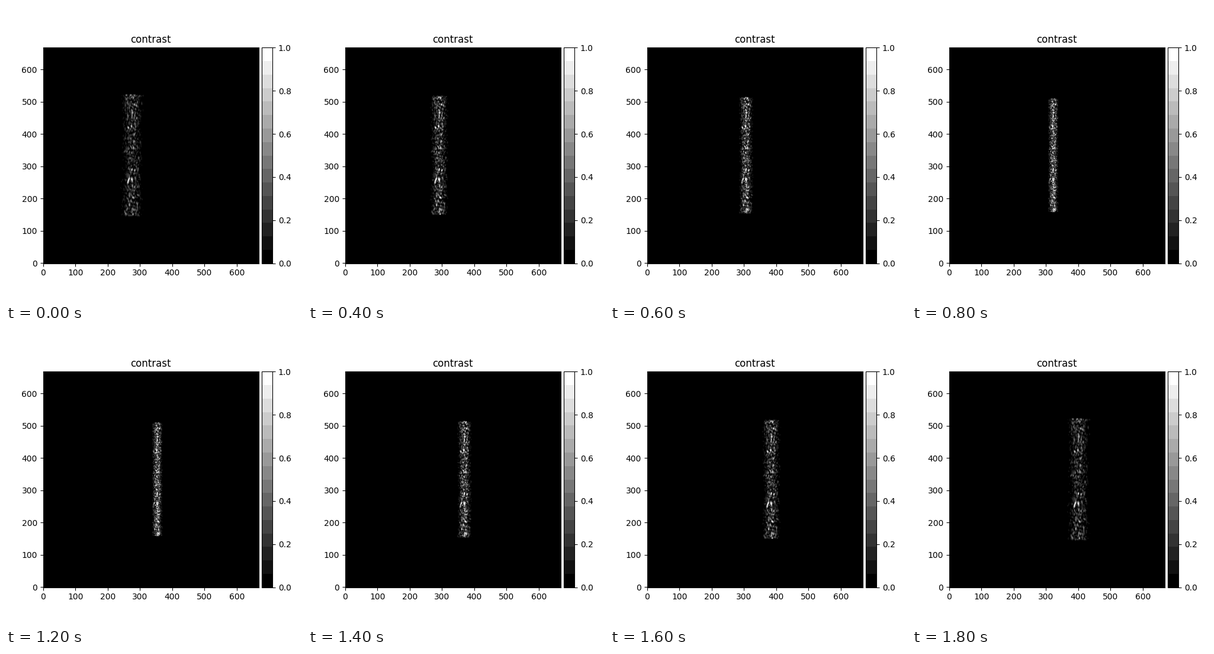
These frames come from a looping animation (500x500 px, 2000 ms). A matplotlib script:

```python
import numpy as np
import matplotlib.pyplot as plt
from matplotlib.animation import FuncAnimation
from mpl_toolkits.axes_grid1 import make_axes_locatable

SIZE = 668
PATCH_H, PATCH_W = 440, 96
STEPS = 10
DRIFT = 15.6

rng = np.random.default_rng(7)
noise = rng.normal(size=(PATCH_H, PATCH_W)) + 1j * rng.normal(size=(PATCH_H, PATCH_W))
spectrum = np.fft.fft2(noise)
freq_y = np.fft.fftfreq(PATCH_H)[:, None]
freq_x = np.fft.fftfreq(PATCH_W)[None, :]
y = np.arange(PATCH_H)[:, None] - PATCH_H / 2
x = np.arange(PATCH_W)[None, :] - PATCH_W / 2


def speckle(sigma_x, sigma_y):
    """Intensity of a random field with the given grain size, unit mean."""
    blur = np.exp(-2 * np.pi**2 * ((freq_x * sigma_x)**2 + (freq_y * sigma_y)**2))
    level = np.abs(np.fft.ifft2(spectrum * blur))**1.6
    return level / level.mean()


def beam(z):
    """Line of speckle at defocus z, brightest and narrowest at z = 0."""
    blur = abs(z)
    half_w = 1.83 * np.hypot(8, 4.6 * z)
    half_h = 174 + 4.3 * blur
    grains = speckle(0.75 + 0.2 * blur, 0.8 + 0.62 * blur)
    profile = np.exp(-0.5 * (x / (half_w / 2.3))**2) * (np.abs(x) < half_w)
    ends = 0.5 * (1 - np.tanh((np.abs(y) - half_h + 3) / 1.5))
    rim = 1 + 0.16 * blur * np.exp(-((np.abs(y) - half_h + 8) / 6)**2)
    gain = 0.5 / (1 + 0.085 * z**2)
    return np.clip(gain * grains * profile * ends * rim, 0, 1)


def picture(step):
    z = max(step - 1, 0) - 4
    image = np.zeros((SIZE, SIZE))
    left = round(336.5 + DRIFT * z - PATCH_W / 2)
    bottom = (SIZE - PATCH_H) // 2
    image[bottom:bottom + PATCH_H, left:left + PATCH_W] = beam(z)
    return image


fig, ax = plt.subplots(figsize=(5, 5), dpi=100)
view = ax.imshow(picture(0), cmap=plt.get_cmap("gray", 16), vmin=0, vmax=1, origin="lower")
ax.set_title("contrast")
cax = make_axes_locatable(ax).append_axes("right", size="5%", pad=0.05)
fig.colorbar(view, cax=cax)


def update(step):
    view.set_data(picture(step))
    return [view]


anim = FuncAnimation(fig, update, frames=STEPS, interval=200, repeat=True, repeat_delay=0)
plt.show()
```
